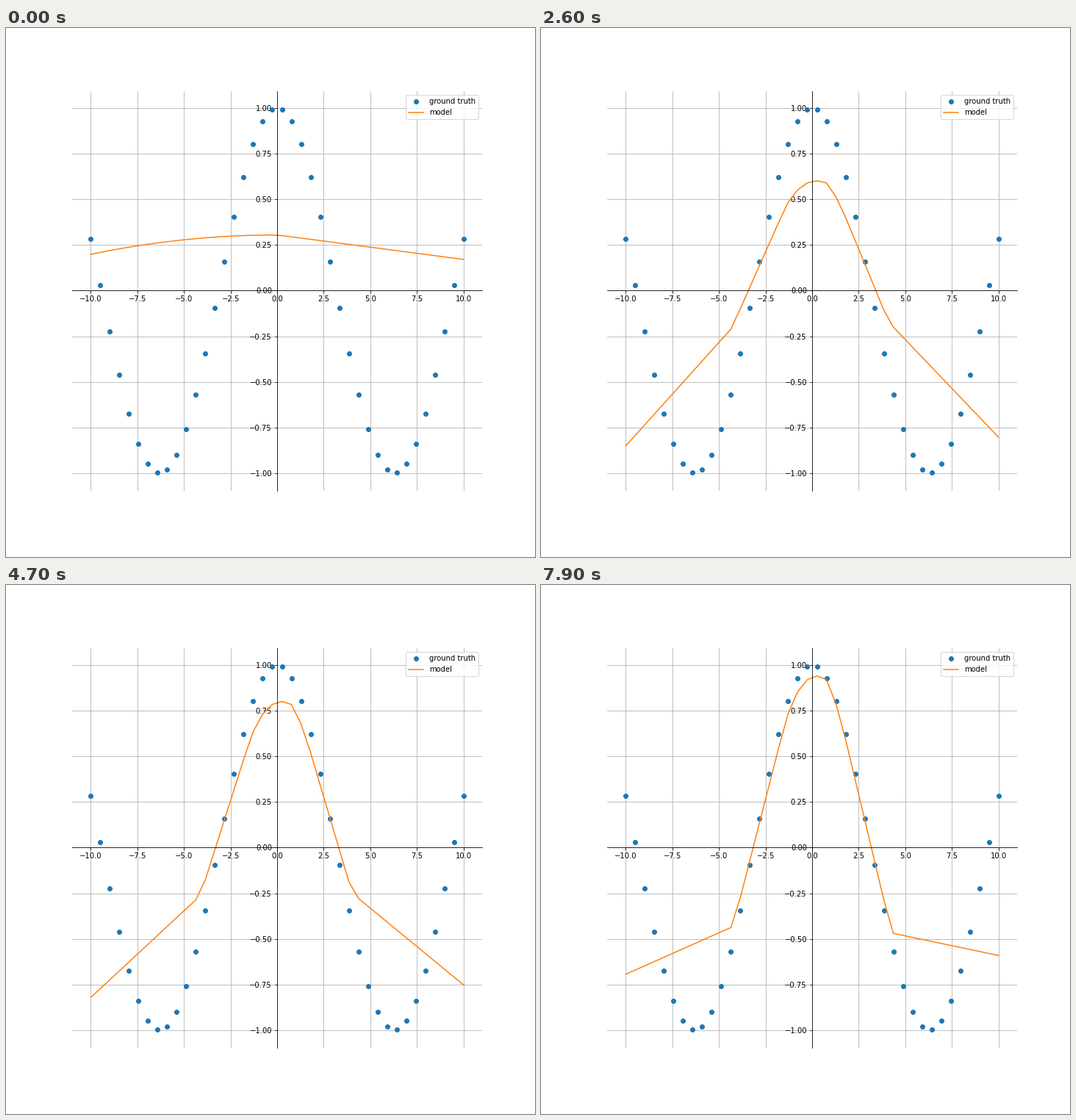
These frames come from a looping animation (720 by 720 pixels, 8 s). A matplotlib script:

```python
import numpy as np
import matplotlib.pyplot as plt
from matplotlib.animation import FuncAnimation

FRAMES, INTERVAL = 80, 100
EARLY = 1.1  # seconds until the untrained shape has faded out


def smooth(*values):
    """Cubic in time (s) through four key values."""
    return np.poly1d(np.polyfit([EARLY, 2.6, 4.7, 7.9], values, 3))


peak = smooth(.389, .602, .801, .941)
slope = smooth(.0835, .118, .1645, .2045)
left_end = smooth(-.814, -.851, -.821, -.694)
left_knee = smooth(-.190, -.211, -.286, -.438)
right_knee = smooth(-.178, -.200, -.278, -.470)
right_end = smooth(-.773, -.803, -.752, -.591)

# Bends of the hump: sample index, and drop below the peak in units of slope.
BENDS = [12, 16, 17, 18, 19, 20, 21, 22, 23, 27]
DROPS = np.array([5.93, 1.93, 1, .42, .1, 0, .1, .75, 1.7, 6])

x = np.linspace(-10, 10, 40)
untrained = .305 - np.where(x < 0, .00106 * x**2, .0134 * x)


def trained(t):
    hump = peak(t) - slope(t) * DROPS
    heights = [left_end(t), left_knee(t), *hump, right_knee(t), right_end(t)]
    return np.interp(np.arange(x.size), [0, 11, *BENDS, 28, 39], heights)


def fit(t):
    fade = max(0, 1 - t / EARLY) ** 2
    return fade * untrained + (1 - fade) * trained(t)


fig, ax = plt.subplots(figsize=(10, 10), dpi=72)
fig.subplots_adjust(left=.125, right=.9, bottom=.125, top=.88)
for side in ("left", "bottom"):
    ax.spines[side].set_position("zero")
for side in ("right", "top"):
    ax.spines[side].set_color("none")
ax.grid(True)

ax.plot(x, np.cos(x / 2), "o", label="ground truth")
model, = ax.plot(x, fit(0), label="model")
ax.legend(loc="upper right")


def update(i):
    model.set_ydata(fit(i * INTERVAL / 1000))
    return model,


anim = FuncAnimation(fig, update, frames=FRAMES, interval=INTERVAL,
                     repeat=True, repeat_delay=0)
plt.show()
```
